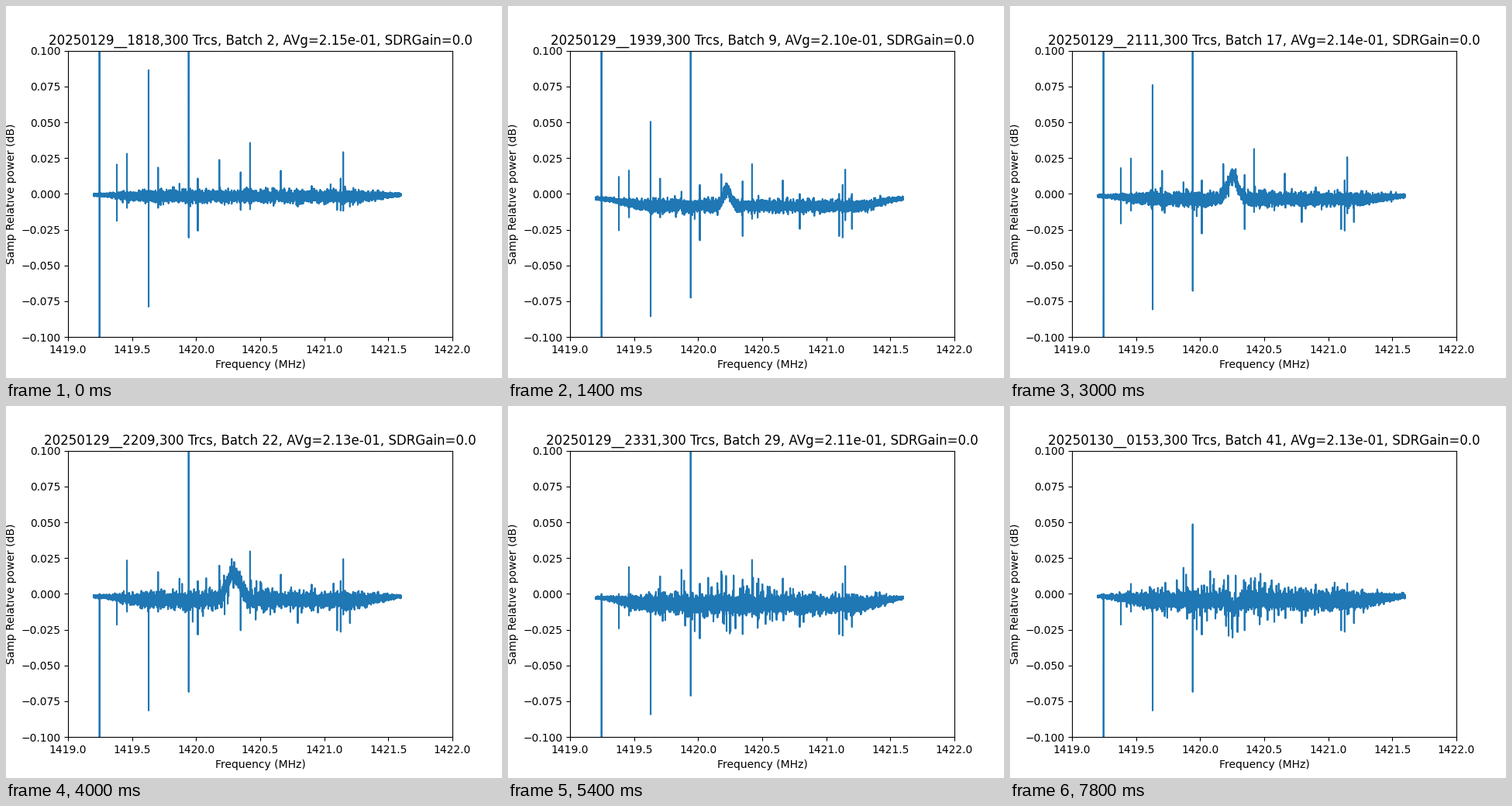
Animation of 640x480 px, one loop 8000 ms. Source, as a matplotlib script:

```python
import numpy as np
import matplotlib.pyplot as plt
from matplotlib.animation import FuncAnimation

FRAMES = 40
POINTS = 8192
LO, HI = 1419.2, 1421.6
CUT = 16  # the first carriers lose their upper half from here on

# (MHz, height, depth), levels in 1e-3 dB
CUT_OFF = [(1419.246, 250, 250), (1419.381, 19, 17), (1419.629, 80, 77)]
STEADY = [(1419.46, 26, 8), (1419.703, 17, 8), (1420.013, 10, 24),
          (1420.181, 22, 0), (1420.421, 33, 9), (1420.661, 15, 0),
          (1421.148, 27, 10)]
GROWING = [(1419.942, 180, 64), (1420.347, 14, 21), (1420.793, 0, 16),
           (1421.1, 0, 21), (1421.128, 10, 22), (1421.2, 0, 16)]

freq = np.linspace(LO, HI, POINTS)


def smooth(t):
    t = np.clip(t, 0, 1)
    return t * t * (3 - 2 * t)


def bell(center, width):
    return np.exp(-0.5 * ((freq - center) / width) ** 2)


def average(n):
    return np.interp(n, [0, 7, 11, 20, 27, 39],
                     [2.15, 2.10, 2.14, 2.13, 2.11, 2.13])


band = smooth((freq - LO) / 0.45) * smooth((HI + 0.05 - freq) / 0.45)
rng = np.random.default_rng(7)
steady = rng.normal(size=POINTS)
rough = rng.normal(size=POINTS) * (rng.random(POINTS) < 0.075) * band


def add_carrier(y, base, f, up, down):
    i = round((f - LO) / (HI - LO) * (POINTS - 1))
    y[i] = max(y[i], up)
    y[i + 1] = min(y[i + 1], base - down)


def spectrum(n):
    drop = 2.15 - average(n)
    late = smooth((n - 11) / 16)
    edge = -0.7 - 50 * drop
    base = -1.8 - 134 * drop

    fresh = np.random.default_rng(100 + n).normal(size=POINTS)
    noise = (0.5 + band * (1.25 + 0.8 * late)) * (0.6 * steady + 0.8 * fresh)
    noise += rough * (2.2 + 1.3 * late + 5 * late * bell(1420.25, 0.27))
    y = edge + (base - edge) * band + noise

    # the line grows, drifts up in frequency, then turns into a dip
    center = np.interp(n, [11, 20, 30], [1420.225, 1420.29, 1420.27])
    width = np.interp(n, [0, 11, 20, 32], [0.025, 0.03, 0.05, 0.03])
    y += np.interp(n, [0, 7, 20, 27, 34], [0, 12, 19, 0, -5]) * bell(center, width)

    gain = (1.08 - 9 * drop) * (1 - 0.7 * smooth((n - 32) / 7))
    growth = 0.45 + 0.55 * smooth(n / 7)
    for f, up, down in CUT_OFF:
        add_carrier(y, base, f, up * gain * (n < CUT), down)
    for f, up, down in STEADY:
        add_carrier(y, base, f, up * gain, down)
    for f, up, down in GROWING:
        add_carrier(y, base, f, up * gain, down * growth)
    return y / 1000


def heading(n):
    minutes = 18 * 60 + 18 + round(11.47 * n + 0.0049 * n * n)
    day, minutes = divmod(minutes, 1440)
    return (f"{20250129 + day}__{minutes // 60:02d}{minutes % 60:02d},300 Trcs, "
            f"Batch {n + 2}, AVg={average(n):.2f}e-01, SDRGain=0.0")


fig, ax = plt.subplots(figsize=(6.4, 4.8), dpi=100)
ax.set_xlim(1419, 1422)
ax.set_ylim(-0.1, 0.1)
ax.ticklabel_format(axis="x", useOffset=False)
ax.set_xlabel("Frequency (MHz)")
ax.set_ylabel("Samp Relative power (dB)")
title = ax.set_title(heading(0))
line, = ax.plot(freq, spectrum(0))


def update(n):
    line.set_ydata(spectrum(n))
    title.set_text(heading(n))
    return line, title


anim = FuncAnimation(fig, update, frames=FRAMES, interval=200,
                     repeat=True, repeat_delay=0, blit=False)
plt.show()
```
